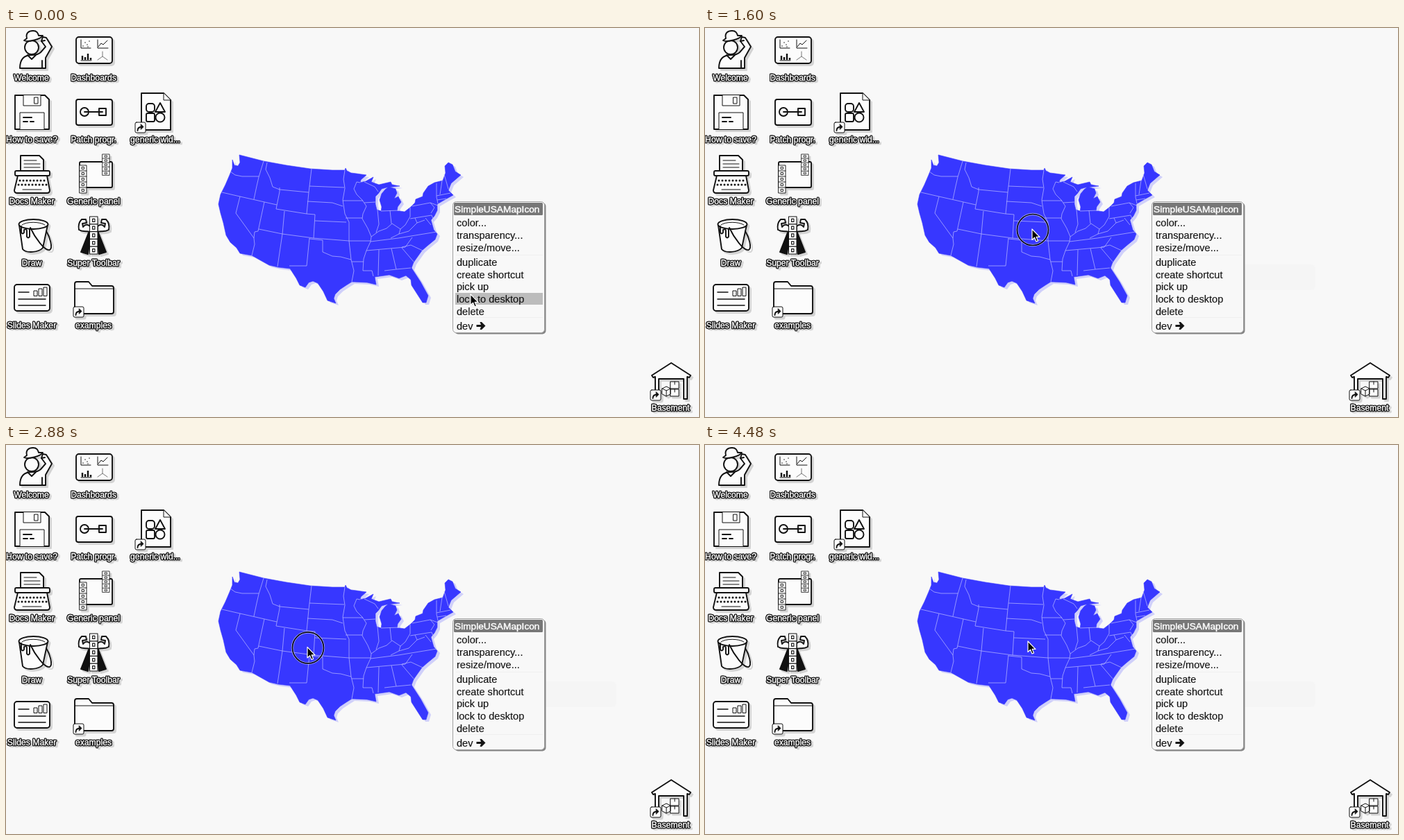
An HTML page that plays this animation: 998x561 px, repeating every 4560 ms.

```html
<!DOCTYPE html>
<html lang="en">
<head>
<meta charset="utf-8">
<title>Desktop map</title>
<style>
  html, body { margin: 0; width: 100%; height: 100%; overflow: hidden; background: #f8f8f8; }
  svg { display: block; width: 100vw; height: 100vh; font-family: "Liberation Sans", Arial, sans-serif; }
  .icons { fill: #fcfcfc; stroke: #111; stroke-width: 1.9; stroke-linejoin: round; stroke-linecap: round;
    filter: drop-shadow(3.5px 3px 0 rgba(0, 0, 0, .15)); }
  .thin { stroke-width: 1; }
  .line { fill: none; }
  .dark { fill: #111; }
  .labels { fill: #fff; stroke: #fff; stroke-width: .35px;
    filter: drop-shadow(1px 0 0 #111) drop-shadow(-1px 0 0 #111) drop-shadow(0 1px 0 #111) drop-shadow(0 -1px 0 #111)
      drop-shadow(3px 2px 0 rgba(0, 0, 0, .14)); }
  .labels text { font-size: 12.2px; text-anchor: middle; }
  .borders { fill: none; stroke: #b4b4ff; stroke-width: .75; stroke-linejoin: round; }
  .menu text { font-size: 14.6px; fill: #141414; stroke: #141414; stroke-width: .15px; }
  .menu .title { font-size: 13.7px; fill: #fff; stroke: #fff; stroke-width: .45px; }
</style>
</head>
<body>
<svg viewBox="0 0 998 561" preserveAspectRatio="none">
  <defs>
    <g id="land">
      <polygon points="326,190 329,198 334,199 337,194 336,183 371,192 404,198 438,203 470,205 488,205
        486,218 488,231 485,248 488,268 494,280 494,307 497,334 501,350 498,366
        490,371 481,377 474,384 472,390 475,397 463,393 457,380 449,368 442,365 436,367 431,374 423,371 418,361 409,347
        392,345 379,342 354,328 337,325 332,317 323,309 317,299 313,281 309,267 306,254 309,240 316,226 322,212 326,202"/>
      <polygon points="488,205 489,202 491,206 497,209 505,210 519,212 511,219 510,223 518,221 529,215 526,222 537,226
        554,222 556,226 567,228 548,230 541,232 536,239 532,243 532,254 534,262 540,264 567,264 574,265 583,258
        589,252 590,247 600,243 601,238 608,228 617,223 629,220 633,209 632,199 637,194 643,197 647,207 655,212
        641,224 637,234 644,241 633,247 621,254 621,263 617,271 612,277 616,291 621,297 618,305 607,314
        599,321 587,338 584,346 597,366 608,386 605,396 600,396 584,371 583,363 576,357 566,361 552,356 531,359
        533,370 520,367 498,366 501,350 497,334 494,307 494,280 488,268 485,248 488,231 486,218"/>
      <polygon points="540,265 541,258 538,248 541,239 546,233 551,229 561,232 563,238 559,246 565,243 569,251 564,258 563,265"/>
    </g>
    <g id="badge">
      <rect width="15" height="15" rx="2" class="thin"/>
      <path class="line" d="M3.5 12C3.5 8 6 6.5 10 6.5"/>
      <path class="dark thin" d="M8.5 3L12 6.5 8.5 10Z"/>
    </g>
    <g id="strip" stroke-width=".9">
      <rect width="10" height="40"/>
      <path class="line" d="M0 8H10M0 16H10M0 24H10M0 32H10"/>
      <path class="line" d="M3.5 2.5h3v3h-3zM3.5 10.5h3v3h-3zM3.5 18.5h3v3h-3zM3.5 26.5h3v3h-3zM3.5 34.5h3v3h-3z"/>
    </g>
  </defs>

  <rect width="998" height="561" fill="#f8f8f8"/>

  <g class="icons">
    <!-- Welcome -->
    <path d="M20 58C20 45 26 39 37 39 43 39 47 38 50 35L57 27 51 19 53 13 58 14 66 27 57 43V58Z"/>
    <path class="line" d="M31 39L37 45 43 39M52 47V58M51 19L56 18"/>
    <circle cx="37" cy="28" r="10"/>
    <path d="M30 15C28 7 33 4 39 4S46 8 47 11L53 11C50 16 32 21 26 18Z"/>
    <!-- Dashboards -->
    <rect x="101" y="13" width="52" height="38" rx="4"/>
    <g class="line thin">
      <path d="M108 17V29H122M132 17V29H147M133 27L137 22 140 24 146 18M108 47H123"/>
      <path d="M139 34V41L132 46M139 41L146 46" stroke="#777"/>
      <path d="M111 26v0M114 21v0M117 24v0M120 19v0M118 27v0" stroke-width="1.5"/>
      <path d="M110 46V40M114 46V42M118 46V37M122 46V43" stroke-width="2.4" stroke-linecap="butt"/>
    </g>
    <!-- How to save? -->
    <path d="M13 97H56L62 103V146H13Z"/>
    <path d="M25 97V112H50V97M20 146V122H55V146" class="thin"/>
    <rect x="41" y="100" width="5" height="9" class="thin"/>
    <path class="line" d="M25 129H37M25 135H31M35 135H40"/>
    <!-- Patch progr. -->
    <rect x="101" y="103" width="52" height="37" rx="3"/>
    <path class="line" d="M113 121H139"/>
    <circle cx="113" cy="121" r="6" class="line"/>
    <rect x="134" y="116" width="10" height="10" class="line"/>
    <!-- generic widget -->
    <path d="M195 94H227L237 104V147H195Z"/>
    <path d="M227 94V104H237" class="thin"/>
    <path class="line" d="M222 108L229 121H215Z"/>
    <rect x="202" y="109" width="12" height="12" rx="4"/>
    <rect x="202" y="123" width="12" height="12" rx="2"/>
    <circle cx="222" cy="129" r="6.5"/>
    <use href="#badge" x="186" y="136"/>
    <!-- Docs Maker -->
    <path d="M21 211V184H48L54 190V211Z"/>
    <path class="line thin" d="M26 191H44M26 196H49M26 201H49M26 206H43"/>
    <rect x="13" y="206" width="50" height="7" rx="2"/>
    <path d="M17 213H59L63 234Q63 238 59 238H16Q12 238 12 234Z"/>
    <path class="line" d="M20 220H57M18 226H59" stroke-width="3" stroke-dasharray="0 5"/>
    <path class="line thin" d="M24 233H51"/>
    <!-- Generic panel -->
    <rect x="106" y="193" width="47" height="37" rx="2"/>
    <use href="#strip" x="106" y="198"/>
    <g transform="translate(139 182) scale(1 .76)"><use href="#strip"/></g>
    <!-- Draw -->
    <path d="M19 284L24 319C29 325 47 324 53 317L60 284Z"/>
    <ellipse cx="39.5" cy="283" rx="21" ry="7"/>
    <path class="line" d="M22 286V295Q24 298 26 295V291Q29 289 30 292V301Q32 304 34 301V290"/>
    <path class="line thin" d="M23 284C29 279 49 279 56 284"/>
    <path class="line" d="M35 288C42 303 56 322 63 320 68 317 63 301 58 293"/>
    <!-- Super Toolbar -->
    <path class="dark" d="M119 295L108 323 118 326 121 305ZM133 295L144 323 134 326 131 305Z"/>
    <path d="M121 286C117 282 113 284 111 287L110 282 116 281 115 276 109 276C105 280 104 286 105 291 111 295 116 292 121 294Z"/>
    <path d="M132 286C136 282 140 284 142 287L143 282 137 281 138 276 144 276C148 280 149 286 148 291 142 295 137 292 132 294Z"/>
    <g transform="translate(120.5 272) scale(1.15 1.35)"><use href="#strip"/></g>
    <!-- Slides Maker -->
    <rect x="12" y="370" width="51" height="38" rx="4"/>
    <path class="line" d="M18 381H33M18 391H57M18 400H57" stroke-width="1.5"/>
    <path class="thin" d="M40 386V379H45V386ZM47 386V376H52V386ZM54 386V374H59V386Z"/>
    <!-- examples -->
    <path d="M99 412V369Q99 366 102 366H119L124 372H152Q155 372 155 375V409Q155 412 152 412Z"/>
    <path class="line thin" d="M99 376H155"/>
    <use href="#badge" x="97" y="402"/>
    <!-- Basement -->
    <path d="M930 501L958 483 986 501 984 504 981 503V535H976V506H940V535H935V503L932 504Z"/>
    <path class="thin" d="M957 510H969V520H957ZM957 521H969V531H957ZM945 520L951 517 957 520V528L951 531 945 528Z"/>
    <path class="line thin" d="M945 520L951 523 957 520M951 523V531M963 510V514M963 521V525"/>
    <use href="#badge" x="928" y="522"/>
  </g>

  <g class="labels">
    <text x="36.500" y="76">Welcome</text>
    <text x="126" y="76">Dashboards</text>
    <text x="37" y="165">How to save?</text>
    <text x="126" y="165">Patch progr.</text>
    <text x="215" y="165">generic wid...</text>
    <text x="37" y="254">Docs Maker</text>
    <text x="126" y="254">Generic panel</text>
    <text x="37" y="343">Draw</text>
    <text x="126" y="343">Super Toolbar</text>
    <text x="37" y="432.5">Slides Maker</text>
    <text x="126" y="432.5">examples</text>
    <text x="957" y="552">Basement</text>
  </g>

  <use href="#land" x="4" y="3" fill="#d0d0fa"/>
  <use href="#land" fill="#3737ff" stroke="#3737ff" stroke-width=".6"/>
  <g class="borders">
    <!-- west -->
    <path d="M323 207L330 212 340 214 364 214M371 192L364 215 361 228 357 247M376 194L374 204 380 216 384 229 394 233"/>
    <path d="M311 237L337 243 390 255M337 243L331 267 357 303 358 312 354 328M372 251L363 293 358 294 357 303"/>
    <path d="M394 230V236L389 261 433 268 436 237 394 233M401 264L398 297 391 344M364 290L398 297 443 303 445 269 433 268"/>
    <!-- plains -->
    <path d="M440 203L436 237M437 228L487 230M434 250L470 252 485 257M445 278L490 280M443 303L494 307M437 303L433 343H408"/>
    <path d="M437 304L456 306V323L470 329 482 330 497 334M488 205L486 218 488 231 485 248 488 268 494 280V307L497 334 501 350 498 366"/>
    <!-- Mississippi -->
    <path d="M510 223L505 222 501 232 505 240 513 248 519 257 514 268 513 275 521 289 526 301 525 308 519 321 515 333 514 350H527L529 358"/>
    <path d="M485 249H514M489 274H513M494 307H525M498 337H515M516 252L532 251M516 222L531 229 536 236"/>
    <!-- east -->
    <path d="M535 262L537 283 533 295M553 263L555 282M540 264L567 263M526 301L537 293 548 289 556 282 568 290 575 284 582 272V259"/>
    <path d="M525 308L565 303 620 294M519 321L575 316M537 320L536 357M555 318L562 348 583 346M545 350L562 348M570 317L587 337M570 316L583 313 600 321"/>
    <path d="M582 275L613 270 616 278M585 257L611 252 617 259 612 267M568 290L566 297 554 303M566 297L580 293 592 281 603 277M575 316L585 302M589 274L592 281"/>
    <path d="M620 224V244L622 253M628 220L625 240M620 242L640 238M621 248L634 246M631 211L637 232M611 252L622 256M604 274L612 284"/>
  </g>

  <rect id="toast" x="764" y="341" width="115" height="37" rx="6" fill="#f5f5f5"/>

  <g class="menu">
    <rect x="646" y="252" width="131.5" height="189.5" rx="5" fill="#858585"/>
    <rect x="643.5" y="250.5" width="132" height="189" rx="5" fill="#f8f8f8" stroke="#a0a0a0"/>
    <rect x="645" y="252" width="128" height="18" rx="1.5" fill="#777"/>
    <path d="M648 327.5H773M648 417.5H773" stroke="#f0f0f0"/>
    <rect id="hover" x="647" y="382" width="126" height="17" fill="#bcbcbc"/>
    <text class="title" x="646" y="266">SimpleUSAMapIcon</text>
    <text x="649" y="286">color...</text>
    <text x="649" y="304">transparency...</text>
    <text x="649" y="322">resize/move...</text>
    <text x="649" y="342.5">duplicate</text>
    <text x="649" y="360.5">create shortcut</text>
    <text x="649" y="378">pick up</text>
    <text x="649" y="396">lock to desktop</text>
    <text x="649" y="414">delete</text>
    <text x="649" y="434.5">dev</text>
    <path d="M677.5 428H684L682.5 424H685L690.5 429.5 685 435H682.5L684 431H677.5Z" fill="#141414"/>
  </g>

  <g id="pointer">
    <g id="ring" fill="none">
      <circle cx="1" cy="1" r="22.5" stroke="#fff" stroke-opacity=".5" stroke-width="3.4"/>
      <circle cx="1" cy="1" r="22.5" stroke="#0a0a14" stroke-width="1.7"/>
    </g>
    <path d="M0 0V15.5L3.6 12.2 6 18 8.6 16.9 6.2 11.4H11Z" stroke="#fff" stroke-width="1.2" stroke-linejoin="round"/>
  </g>
</svg>
<script>
  const LOOP = 4560, TICK = 80;
  // time, x, y of the pointer tip
  const path = [
    [0, 669, 384], [1040, 674, 392], [1120, 674, 392], [1520, 468, 288], [1600, 471, 290],
    [2320, 507, 292], [3360, 376, 291], [4000, 376, 292], [4080, 376, 292], [4480, 465, 283], [LOOP, 465, 283]
  ];
  const el = id => document.getElementById(id);
  const [pointer, ring, hover, toast] = ["pointer", "ring", "hover", "toast"].map(el);
  const show = (node, on) => node.setAttribute("visibility", on ? "visible" : "hidden");
  const ease = k => k * k * (3 - 2 * k);

  function pointerAt(t) {
    const i = path.findIndex(p => p[0] > t);
    const [t0, x0, y0] = path[i - 1], [t1, x1, y1] = path[i];
    const k = ease((t - t0) / (t1 - t0));
    return [x0 + (x1 - x0) * k, y0 + (y1 - y0) * k];
  }

  function draw() {
    const t = Math.floor(performance.now() % LOOP / TICK) * TICK;
    const [x, y] = pointerAt(t);
    pointer.setAttribute("transform", `translate(${x.toFixed(2)} ${y.toFixed(2)})`);
    show(ring, t >= 1520 && t <= 4080);
    show(hover, t <= 1120);
    show(toast, t >= 720);
    requestAnimationFrame(draw);
  }
  draw();
</script>
</body>
</html>
```
